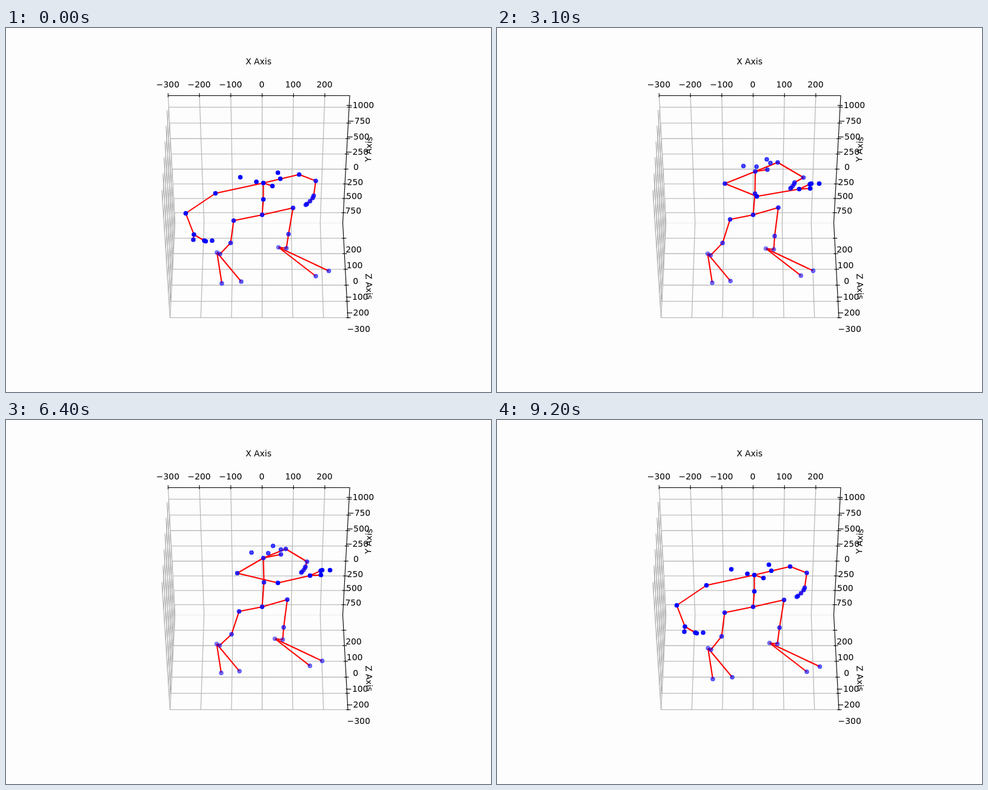
Write an HTML page that moves like this. It is 800 by 600 pixels and loops after 9.3 s.

```html
<!DOCTYPE html>
<html lang="en">
<head>
<meta charset="utf-8">
<title>3D pose</title>
<style>
html, body { margin: 0; width: 100%; height: 100%; overflow: hidden; background: #fdfdfd; }
svg { display: block; }
text { font: 13.89px "DejaVu Sans", sans-serif; text-anchor: middle; }
polyline { fill: none; stroke-width: 1.11; }
.grid { stroke: #b0b0b0; }
.edge { stroke: #ebebeb; }
.axis { stroke: #000; }
.bone { stroke: #f00; stroke-width: 2.08; stroke-linejoin: round; }
.dot { fill: #00f; stroke: #00f; stroke-width: 1.39; }
</style>
</head>
<body>
<svg id="stage" width="800" height="600" viewBox="0 0 800 600"></svg>
<script>
const LOOP = 9300, STEP = 100, TAU_SHOT = LOOP / 5;
const stage = document.getElementById("stage");

function add(parent, tag, attrs) {
  const el = document.createElementNS("http://www.w3.org/2000/svg", tag);
  for (const key in attrs) el.setAttribute(key, attrs[key]);
  parent.append(el);
  return el;
}
// Half a pixel puts thin lines on pixel centres
const plot = add(stage, "g", { transform: "translate(.5 .5)" });
const path = (cls, ...pts) => add(plot, "polyline", { class: cls, points: pts.join(" ") });
function label(s, x, y, turn = 0) {
  const transform = `translate(${x} ${Math.round(y)}) rotate(${turn})`;
  add(stage, "text", { transform, y: 5 }).textContent = String(s).replace("-", "\u2212");
}

const lerp = (a, b, k) => a + (b - a) * k;
const ramp = (v, from, to) => Math.min(1, Math.max(0, (v - from) / (to - from)));
const ease = (v, from, to) => {
  const k = ramp(v, from, to);
  return k * k * (3 - 2 * k);
};

// The box folds at FOLD: x-y plane above, x-z plane below
const TOP = 111, FOLD = 321, BOTTOM = 477;
const sideX = (y, top, fold, bottom) => y < FOLD
  ? lerp(top, fold, ramp(y, TOP, FOLD))
  : lerp(fold, bottom, ramp(y, FOLD, BOTTOM));
const leftX = y => sideX(y, 267, 278.5, 270);
const rightX = y => sideX(y, 566.5, 555, 563.5);

function drawAxes() {
  const row = (y, wall) => path("grid", wall, [leftX(y), y], [rightX(y), y]);
  const tick = y => path("axis", [rightX(y) - 3, y], [rightX(y) + 4.5, y]);
  const yRow = i => 130 + 26.4 * i - 0.22 * i * i;
  const zRow = i => 346 + 25.2 * i + 0.2 * i * i;

  path("edge", [leftX(FOLD), FOLD], [rightX(FOLD), FOLD]);
  for (let v = -3; v <= 2; v++)
    path("grid", [422 + v * 51.7, TOP], [422 + v * 47.9, FOLD], [422 + v * 50.6, BOTTOM]);
  for (let i = 0; i < 8; i++) {
    const k = ramp(yRow(i), TOP, FOLD);
    row(yRow(i), [lerp(256.5, 270, k), lerp(267, BOTTOM, k)]);
  }
  for (let i = 0; i < 6; i++)
    row(zRow(i), [265 - 1.7 * i, 135 + 25.2 * i + 0.24 * i * i]);

  path("axis", [266.5, TOP], [566.5, TOP], [555, FOLD], [563.5, BOTTOM + 1]);
  for (let v = -3; v <= 2; v++) {
    const x = 422 + v * 51.7;
    path("axis", [x, 107], [x, 113.5]);
    label(v * 100, x, 93);
  }
  for (let i = 0; i < 8; i++) {
    tick(yRow(i));
    label(i * 250 - 1000, 583.6 - 1.55 * i, yRow(i) - 3);
  }
  for (let i = 0; i < 6; i++) {
    tick(zRow(i));
    label(200 - i * 100, 573.4 + 1.65 * i, zRow(i) + 19.3);
  }
  label("X Axis", 416.5, 55);
  label("Y Axis", 598, 199.5, -87);
  label("Z Axis", 599, 425.5, 87);
}

// One entry per stroke: body lift, foot dip, where the swinging wrist and the other wrist end
const SHOTS = [
  { lift: 0.9, dip: -3, hand: [528, 264], fist: [505, 250] },
  { lift: 0, dip: 1, hand: [498, 265], fist: [490.5, 254] },
  { lift: 0, dip: 0, hand: [491, 253], fist: [509, 263] },
  { lift: 1, dip: -2, hand: [501, 256], fist: [493.5, 241] },
  { lift: 0.85, dip: 3, hand: [515, 273], fist: [509, 248] }
];

// Builds all joints and bones for time t
function figure(t) {
  const n = Math.floor(t / TAU_SHOT), p = t / TAU_SHOT - n;
  const { lift, dip, hand, fist } = SHOTS[n];
  const next = SHOTS[n + 1] || SHOTS[n];
  const w = ease(p, 0.17, 0.4) - ease(p, 0.67, 0.84);
  const loop = Math.sin(Math.PI * ramp(p, 0.67, 0.84));
  const drop = lerp(dip, next.dip, ease(p, 0.75, 1));
  const dots = [], bones = [];

  // Joint between its wound-up and swung-through places, relative to a base
  const joint = (base, x0, y0, x1, y1, a0, a1 = a0) => {
    const pt = { x: base.x + lerp(x0, x1, w), y: base.y + lerp(y0, y1, w), a: lerp(a0, a1, w) };
    dots.push(pt);
    return pt;
  };
  const bone = (...pts) => bones.push(pts);
  const origin = { x: 0, y: 0 };

  const pelvis = joint(origin, 422, 307.5, 422, 307.5, 0.82);
  const spine = joint(origin, 424, 282, 425, 272.5 - 5.5 * lift, 0.95, 0.78);
  const neck = joint(origin, 424, 255, 425.5 - 1.5 * lift, 236 - 9 * lift, 1, 0.75);
  const face = (...xy) => joint(neck, ...xy, 1, 0.72);
  const head = face(15, 5, 20 + 9 * lift, -3 - 3 * lift);
  face(-38, -9.5, -19.5, -9);
  face(-11.5, -2, 2 + 6 * lift, -8);
  face(24, -17, 19 - 3 * lift, -20);
  face(28, -7, 25 + 4 * lift, -14);
  bone(pelvis, spine, neck, head);

  // Swinging arm: returns through a high loop on the left
  const arc = { x: -80 * loop, y: -125 * loop };
  const shoulder = joint(neck, -79, 17, -50 + 7 * lift, 20 + 5 * lift, 1, 0.78);
  const elbow = joint({ x: arc.x / 2, y: arc.y / 2 },
    296, 305, 428 + 20 * lift, hand[1] + 12, 1);
  const wrist = joint(arc, 309.5, 340, ...hand, 0.95, 1);
  const thumb = joint(wrist, -1, 8.5, 18, -1, 0.9, 1);
  const palm = joint(wrist, 17, 10, 17.5, -8, 0.92, 1);
  const knuckle = joint(wrist, 19.5, 11, 20, -9, 0.92, 1);
  joint(wrist, 30, 10, 33, -9, 0.9, 1);
  bone(neck, shoulder, elbow, wrist, thumb);
  bone(wrist, palm, knuckle);

  const shoulder2 = joint(neck, 59, -14, 37, -15, 0.85, 0.7);
  const elbow2 = joint(origin, 510.5, 251.5, 505 - 9 * lift, 246 - 13 * lift, 0.78, 0.63);
  const wrist2 = joint(origin, 507, 276, ...fist, 0.76, 0.62);
  const fingers = [0.25, 0.6, 0.9, 1].map(f =>
    joint(wrist2, -13 * f ** 1.5, 15 * f, -7 * f ** 1.5, 10 * f, 0.75, 0.6));
  bone(neck, shoulder2, elbow2, wrist2, ...fingers);

  // Leg: hip and knee are free, the foot moves as one piece
  const leg = (hip, knee, heel, toes, ankle, slide) => {
    const hipJoint = joint(origin, ...hip, 0.8, 0.76);
    const kneeJoint = joint({ x: 0, y: drop * 0.4 }, ...knee, 0.68, 0.62);
    const [x, y] = heel;
    const heelJoint = joint({ x, y: y + drop }, 0, 0, slide, -2, 0.48, 0.43);
    const ankleJoint = joint(heelJoint, ...ankle, ...ankle, 0.52, 0.47);
    bone(pelvis, hipJoint, kneeJoint, ankleJoint, heelJoint);
    for (const [dx, dy] of toes)
      bone(heelJoint, joint(heelJoint, dx, dy, dx * 0.94, dy * 0.94, 0.57, 0.5));
  };
  leg([375, 317, 384, 315], [370, 355, 371.5, 353.5], [347.5, 372.5],
    [[8, 51], [40, 48]], [5, 2.5], -0.5);
  leg([473, 296, 463.5, 295.5], [465.5, 340.5, 457.5, 342], [449, 364],
    [[61.5, 47.5], [83, 39]], [13, 1.5], -6);

  return { dots, bones };
}

drawAxes();
const first = figure(0);
const boneEls = first.bones.map(() => path("bone"));
const dotEls = first.dots.map(() => add(plot, "circle", { class: "dot", r: 3.1 }));

function draw(t) {
  const { dots, bones } = figure(t);
  bones.forEach((pts, i) =>
    boneEls[i].setAttribute("points", pts.map(({ x, y }) => [x.toFixed(2), y.toFixed(2)]).join(" ")));
  dots.forEach(({ x, y, a }, i) => {
    const attrs = { cx: x.toFixed(2), cy: y.toFixed(2), "fill-opacity": a, "stroke-opacity": a };
    for (const key in attrs) dotEls[i].setAttribute(key, attrs[key]);
  });
}

const start = performance.now();
function tick() {
  const t = Math.max(0, performance.now() - start) % LOOP;
  draw(Math.floor(t / STEP) * STEP);
  requestAnimationFrame(tick);
}
tick();
</script>
</body>
</html>
```
